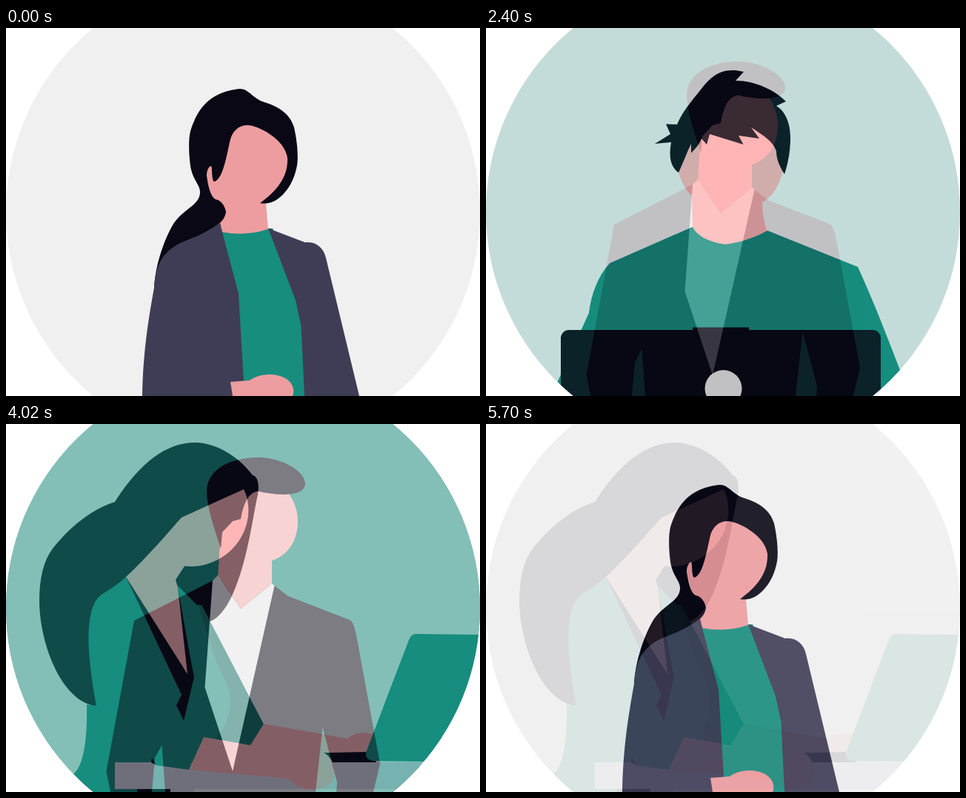
These frames come from a looping animation (640 px wide and 496 px high, 5760 ms). An HTML page:

```html
<!DOCTYPE html>
<html lang="en">
<head>
<meta charset="utf-8">
<title>Four portraits</title>
<style>
  html, body { margin: 0; width: 100%; height: 100%; overflow: hidden; background: #fff; }
  svg { display: block; width: 640px; height: 496px; }

  .ground { fill: #f0f0f0; }
  .ink { fill: #090814; }
  .teal { fill: #178d7e; }
  .shade { fill: #167269; }
  .skin { fill: #ffb6b6; }
  .rose { fill: #ed9da0; }
  .jacket { fill: #3f3d56; }
  .shirt { fill: #f2f2f2; }
  .desk { fill: #d6d6e3; }

  /* Each portrait fades in over the previous one in ten steps of 60 ms. */
  .fade { opacity: 0; animation: 5760ms step-end infinite; }
  #student { animation-name: student; }
  #suit { animation-name: suit; }
  #typist { animation-name: typist; }

  @keyframes student {
    0% { opacity: 0; }
    14.58333% { opacity: 0; animation-timing-function: steps(10, end); }
    25% { opacity: 1; }
    75%, 100% { opacity: 0; }
  }
  @keyframes suit {
    0% { opacity: 0; }
    39.58333% { opacity: 0; animation-timing-function: steps(10, end); }
    50% { opacity: 1; }
    75%, 100% { opacity: 0; }
  }
  @keyframes typist {
    0% { opacity: 0; }
    64.58333% { opacity: 0; animation-timing-function: steps(10, end); }
    75% { opacity: 1; }
    89.58333% { opacity: 1; animation-timing-function: steps(10, end); }
    100% { opacity: 0; }
  }
</style>
</head>
<body>
<svg viewBox="0 0 640 496">
  <clipPath id="disc"><circle cx="320" cy="248" r="320"/></clipPath>
  <g clip-path="url(#disc)">

    <g id="ponytail">
      <rect class="ground" width="640" height="496"/>
      <path class="teal" d="M285 270H360L410 400V496H310Z"/>
      <path class="rose" d="M326 125C300 126 290 170 277 184C270 189 270 200 273 210C276 224 280 232 290 234L286 255L292 275Q324 281 354 271L351 236C370 225 384 205 384 180C384 150 350 130 326 125Z"/>
      <path class="ink" d="M200 352C201 320 214 284 226 264C240 243 262 239 262 221C262 211 252 205 249 186C247 172 246 151 249 139C260 103 280 86 315 82C326 81 332 93 346 99C366 105 383 114 389 134C393 152 395 172 393 185C388 215 366 241 343 236C366 219 381 201 380 175C377 150 340 131 326 131C314 131 306 139 303 150C298 170 294 201 282 207C277 208 279 188 277 186C273 187 271 193 271 199C273 213 276 227 283 231C291 232 296 241 297 248C295 258 290 270 235 292L215 320Z"/>
      <path class="jacket" d="M289 262L292 275L314 358L321 476L322 496H184C185 440 191 400 200 350C202 320 211 302 235 290C255 282 273 275 289 262Z"/>
      <path class="jacket" d="M354 270L404 289C418 287 429 296 432 310L477 496H403L398.500 402L391 367Z"/>
      <path class="rose" d="M303 477L329 475C342 465 367 464 380 474C388 480 390 489 387 496H306Z"/>
    </g>

    <g id="student" class="fade">
      <rect class="ground" width="640" height="496"/>
      <path class="skin" d="M260 193C263 207 270 219 278 226L279 275L324 300L380 280L379 273C375 260 373 247 373 235C386 228 396 213 401 193L390 120H275Z"/>
      <path class="teal" d="M167 317L279 268C285 282 307 290 324 291.500C345 289 366 281 380 273L502 322C521 363 541 414 559 461L575 500H86L97 476L139 384C142 360 150 336 167 317Z"/>
      <path class="ink" d="M228 156L249 143L243 129.500L258 130C265 113 278 98 290 83C302 68 316 51 348 59L337 71C364 71 390 84 405 99L392 105C404 112 411 128 411 148C411 168 407 185 403 197C396 186 392 176 392 166C388 152 370 142 358 134L369 149L341 145L347.500 157L302 143L298 157L291 149C287 159 282 163 277 168.500V156C271 168 266 182 260 195C248 186 247 172 250 154Z"/>
      <rect class="ink" x="101" y="407" width="432" height="110" rx="11"/>
      <rect class="ink" x="279" y="403.500" width="76" height="8"/>
      <circle class="ground" cx="320.500" cy="486" r="25"/>
    </g>

    <g id="suit" class="fade">
      <rect class="teal" width="640" height="496"/>
      <path class="skin" d="M290 140L286 210L317 255L359 220V184C380 178 394 157 394 132C394 118 390 106 382 94L340 85L310 105Z"/>
      <path class="ink" d="M290 168C281 140 271 112 271 89C273 59 305 45 342 45C373 46 404 63 404 81C403 97 371 98 340 90.500C325 93 320 112 317 128L306 131L292 146Z"/>
      <path class="ink" d="M173 265L281 210L361 217L381 232L464 264C470 267 472 280 474 290L505 458L496 496H446L447 483L427.500 409L418 496H215L210.500 433L201 450L197 496H141L135.500 468Z"/>
      <path class="skin" d="M287 200L286 204L317 249L359 215V200Z"/>
      <path class="shirt" d="M286 204L317 249L359 215L362.500 218L306 468L268.500 355L279 211Z"/>
    </g>

    <g id="typist" class="fade">
      <rect class="ground" width="640" height="496"/>
      <path class="ink" d="M147 105C181 52 216 25 256 25C285 26 313 43 333 69C341 71 342 84 340 95C334 121 327 178 310 220C300 246 288 261 276 266L220 300L122 380C75 375 45 295 45 238C45 207 51 184 63 168C86 139 115 115 147 105Z"/>
      <path class="teal" d="M162 206C152 215 142 222 132 228C106 242 107 300 122 380L109 378C110 420 106 460 91 472L110 500H177V470H250L331 433L348 405L264 244H258L231 217L240 300Z"/>
      <path class="ink" d="M177 485H222V496H177Z"/>
      <path class="desk" d="M147 456H600V492H254V496H222V492H147Z"/>
      <path class="teal" d="M190 410H270L247 466L203 460L190 440Z"/>
      <path class="ink" d="M197 450L203 460L196 456Z"/>
      <path class="shade" d="M264 244L348 405L331 433L283 424C300 405 305 385 303 365C298 344 285 328 278 303L260 244Z"/>
      <path class="ink" d="M162 206L237 365L230 379L240 400L254 341C246 300 239 260 231 214Z"/>
      <path class="skin" d="M321 88C327 100 329 115 326 130C319 166 284 196 241 191.500L229 210L232 220L245 337L162 206C190 180 214 152 237 126Z"/>
      <path class="ink" d="M425 443L492 441L500 456H425Z"/>
      <path class="skin" d="M267 422L330 433L348 404L461 424C470 415 490 414 499 420L490 442L429 443C445 451 447 475 438 485C424 497 395 495 381 478L247 466Z"/>
      <path class="teal" d="M555 283L640 284V456L496 454C487 453 484 447 487 440L544 291C547 284 550 283 555 283Z"/>
    </g>

  </g>
</svg>
</body>
</html>
```
